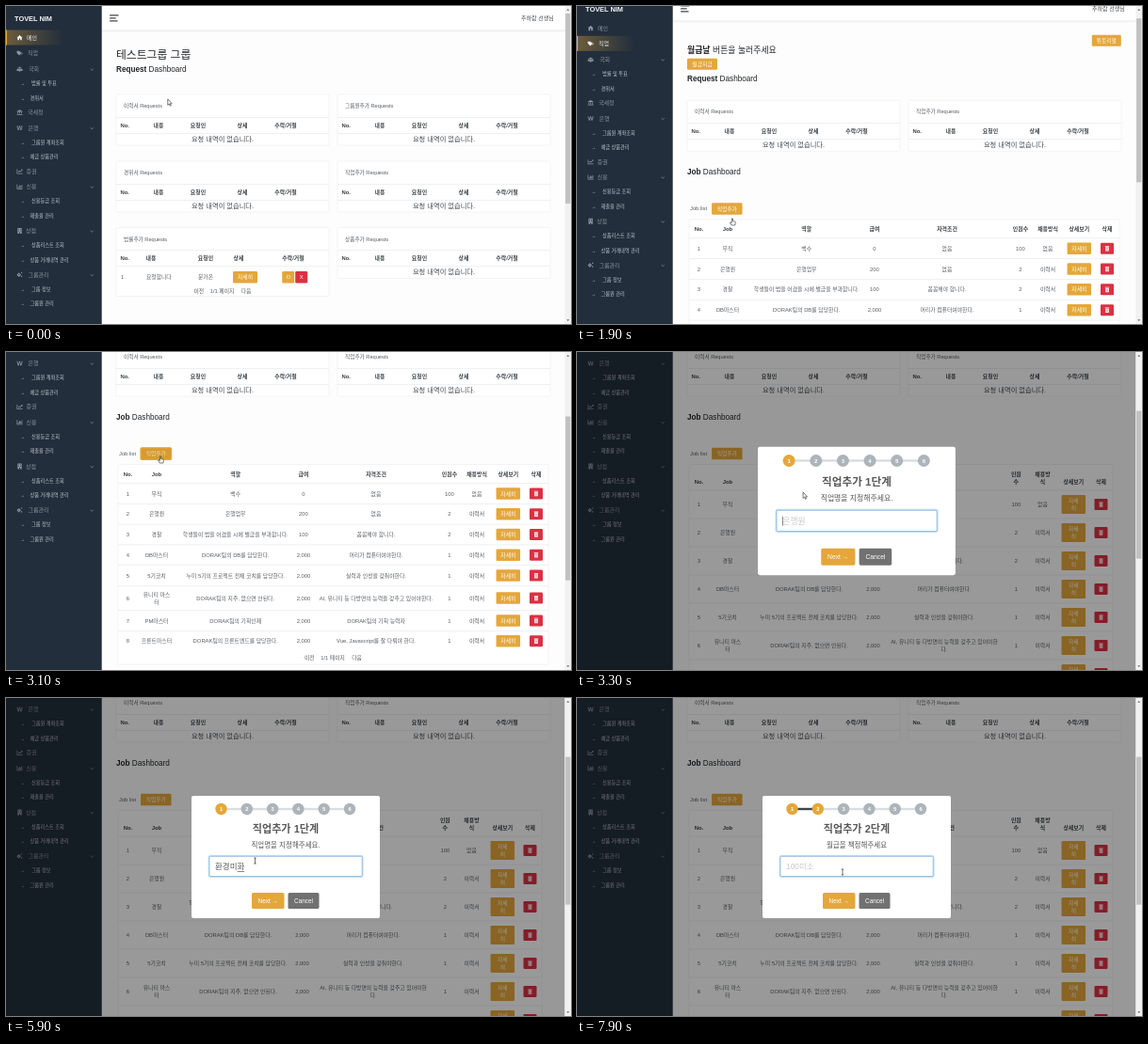
An HTML page for the animation above (8000 ms loop, 600 by 338 pixels).

```html
<!DOCTYPE html>
<html lang="ko">
<head>
<meta charset="utf-8">
<title>Job Dashboard</title>
<style>
html, body { margin: 0; width: 100%; height: 100%; overflow: hidden; background: #fff; }
svg { display: block; width: 600px; height: 338px; }
text { font-family: "Liberation Sans", "Noto Sans CJK KR", "Noto Sans CJK JP", sans-serif; white-space: pre; }
</style>
</head>
<body>
<svg id="stage" viewBox="0 0 600 338" xmlns="http://www.w3.org/2000/svg"></svg>
<script>
const LOOP = 8000;
const GOLD = '#e4a73a', RED = '#dc3043', INK = '#212529', GRAY = '#565c63';

// Drawing helpers; text is placed by the middle of its line.
const text = (x, y, s, size, { fill = GRAY, at = 'start', bold = false } = {}) =>
  `<text x="${x}" y="${(y + size * 0.37).toFixed(2)}" font-size="${size}" fill="${fill}" text-anchor="${at}" font-weight="${bold ? 700 : 400}">${s}</text>`;
const mid = (x, y, s, size, o = {}) => text(x, y, s, size, { at: 'middle', ...o });
const rect = (x, y, w, h, fill, r = 0, extra = '') =>
  `<rect x="${x}" y="${y}" width="${w}" height="${h}" rx="${r}" fill="${fill}" ${extra}/>`;
const path = (d, extra) => `<path d="${d}" ${extra}/>`;
const rule = (x, y, w) => rect(x, y, w, 0.6, '#e3e6e9');
const group = (id, body, extra = '') => `<g id="${id}" ${extra}>${body}</g>`;
const lines = (x, y, s, size, o) => {
  const parts = s.split('|');
  return parts.map((p, i) => mid(x, y + (i - (parts.length - 1) / 2) * 8, p, size, o)).join('');
};
const button = (cx, cy, w, h, s, fill = GOLD) =>
  rect(cx - w / 2, cy - h / 2, w, h, fill, 1.2) + lines(cx, cy, s, 5.8, { fill: '#fff' });
const panel = (x, y, w, h) =>
  rect(x, y, w, h, '#fff', 1.2, 'stroke="#000" stroke-opacity=".045" stroke-width="1"');

// Sidebar
const ICONS = {
  home: 'M0 3.2L3 .4L6 3.2H5.2V5.8H3.6V4H2.4V5.8H.8V3.2Z',
  tags: 'M0 .8H2.6L5 3.2L2.6 5.6L0 3ZM3.4 .8L6.4 3.2L4 5.6L5.6 3.2Z',
  users: 'M1 1.4H2.2V2.6H1ZM3.8 1.4H5V2.6H3.8ZM2.3 .8H3.7V2.6H2.3ZM0 3H1.8V5H0ZM2 3H4V5.6H2ZM4.2 3H6V5H4.2Z',
  bank: 'M0 2L3 .2L6 2V2.5H0ZM.8 2.8H1.6V4.6H.8ZM2.6 2.8H3.4V4.6H2.6ZM4.4 2.8H5.2V4.6H4.4ZM0 4.9H6V5.7H0Z',
  won: 'M0 .8H.9L1.7 4L2.6 .8H3.4L4.3 4L5.1 .8H6L4.8 5.4H3.9L3 2.4L2.1 5.4H1.2ZM0 2.4H6V3H0Z',
  line: 'M0 .6H.7V5H6V5.7H0ZM1.2 3.6L2.6 2L3.6 3L5 1.4L4.4 .9H6V2.5L5.5 2L3.6 4L2.6 3L1.6 4.2Z',
  bars: 'M0 .6H.7V5H6V5.7H0ZM1.3 3H2.1V4.5H1.3ZM2.6 1.4H3.4V4.5H2.6ZM3.9 2.2H4.7V4.5H3.9ZM5.1 1H5.8V4.5H5.1Z',
  shop: 'M.8 0H5.2V6H3.5V4.6H2.5V6H.8ZM1.7 1V1.8H2.5V1ZM3.5 1V1.8H4.3V1ZM1.7 2.7V3.5H2.5V2.7ZM3.5 2.7V3.5H4.3V2.7Z',
  cogs: 'M1.5 1.2H2.9V2L4.1 2.4V4L2.9 4.4V5.2H1.5V4.4L.3 4V2.4L1.5 2ZM1.7 2.8V3.7H2.7V2.8ZM4.5 .4H5.7V1.6H4.5ZM4.5 4.2H5.7V5.4H4.5Z'
};
const MENU = [
  ['home', 33.5, 22, '메인'], ['tags', 50, 23, '직업'],
  ['users', 67, 24, '국회', '법률 및 투표', '경위서'],
  ['bank', 113, 23, '국세청'],
  ['won', 129.5, 23.5, '은행', '그룹원 계좌조회', '예금 상품관리'],
  ['line', 175.7, 21.5, '증권'],
  ['bars', 192, 21.5, '신용', '신용등급 조회', '재출율 관리'],
  ['shop', 239, 21, '상점', '상품리스트 조회', '상품 거래내역 관리'],
  ['cogs', 285.5, 23.5, '그룹관리', '그룹 정보', '그룹원 관리']
];
const menu = active => {
  let out = text(9, 13, 'TOVEL NIM', 7.4, { fill: '#f4f6f8', bold: true });
  MENU.forEach(([icon, y, x, label, ...subs], i) => {
    const on = i === active, fill = on ? '#f1f3f5' : '#8d959d';
    if (on) out += rect(0, y - 8, 102, 16, 'url(#glow)') + rect(0, y - 8, 1, 16, GOLD);
    out += path(ICONS[icon], `transform="translate(11.5 ${y - 3})" fill="${fill}" fill-rule="evenodd"`);
    out += text(x, y, label, 6, { fill });
    if (subs.length) out += path(`M89.6 ${y - 0.2}l1.6 1.5l1.6 -1.5`, 'fill="none" stroke="#8d959d" stroke-width=".7"');
    subs.forEach((s, k) => {
      const sy = y + 15.5 + k * 15.3;
      out += text(15, sy, '→', 5.2, { fill: '#c3c8ce' }) + text(k ? 25.5 : 27, sy, s, 5.2, { fill: '#c3c8ce' });
    });
  });
  return out;
};

// Page parts
const navbar = rect(102, 0, 492, 25.5, '#fff') + rect(102, 25.5, 492, 3, 'url(#fall)') +
  [[10, 9.6], [13, 6.8], [16, 8.6]].map(([y, w]) => rect(110, y - 0.7, w, 1.3, '#40464c', 0.5)).join('') +
  text(547, 12.5, '추하람 선생님', 6, { fill: '#43494f' });

const heading = (y, bold, plain, size = 8.2) =>
  text(117, y, `<tspan font-weight="700">${bold}</tspan>${plain}`, size, { fill: INK });

const HEADS = ['No.', '내용', '요청인', '상세', '수락/거절'];
const requestCard = (x, y, title, h = 54, cols = [9.2, 45, 87, 134, 180]) =>
  panel(x, y, 226, h) + text(x + 8, y + 12, title + ' Requests', 5.65) + rule(x, y + 24, 226) +
  HEADS.map((s, i) => mid(x + cols[i], y + 32.8, s, 5.9, { fill: '#3a4046', bold: true })).join('') +
  rule(x, y + 41, 226);
const emptyCard = (x, y, title) =>
  requestCard(x, y, title) + mid(x + 113, y + 47.3, '요청 내역이 없습니다.', 7.25, { fill: '#43494f' });
const pager = (x, y) => mid(x - 24.7, y, '이전', 5.8) + mid(x, y, '1/1 페이지', 5.8) + mid(x + 25.5, y, '다음', 5.8);

const mainPage = navbar + text(117, 51.5, '테스트그룹 그룹', 11.8, { fill: INK }) + heading(67, 'Request', ' Dashboard') +
  emptyCard(117, 94, '이력서') + emptyCard(352, 94, '그룹원추가') +
  emptyCard(117, 165, '경위서') + emptyCard(352, 165, '직업추가') +
  requestCard(117, 235.5, '법률추가', 73, [9.2, 37, 95, 130, 188]) + emptyCard(352, 235.5, '상품추가') +
  mid(123.5, 288.3, '1', 5.8) + text(149, 288.3, '요청합니다', 5.8) + mid(212, 288.3, '문가온', 5.8) +
  button(254, 288.3, 26, 12.5, '자세히') + button(299.7, 288.3, 13, 12.5, 'O') + button(313.7, 288.3, 13, 12.5, 'X', RED) +
  pager(229.5, 303);

// Job table: role and requirement are [wide, narrow] when they wrap differently.
const JOBS = [
  ['무직', '백수', '0', '없음', '100', '없음'],
  ['은행원', '은행업무', '200', '없음', '2', '이력서'],
  ['경찰', ['학생들이 법을 어겼을 시에 벌금을 부과합니다.', '학생들이 법을 어겼을 시에 벌금을 부과합니|다.'], '100', '꼼꼼해야 합니다.', '2', '이력서'],
  ['DB마스터', 'DORAK팀의 DB를 담당한다.', '2,000', '머리가 컴퓨터여야한다.', '1', '이력서'],
  ['5기코치', '누미 5기의 프로젝트 전체 코치를 담당한다.', '2,000', '실력과 인성을 갖춰야한다.', '1', '이력서'],
  ['유니티 마스|터', 'DORAK팀의 지주, 없으면 안된다.', '2,000', ['AI, 유니티 등 다방면의 능력을 갖추고 있어야한다.', 'AI, 유니티 등 다방면의 능력을 갖추고 있어야한|다.'], '1', '이력서'],
  ['PM마스터', 'DORAK팀의 기획인재', '2,000', 'DORAK팀의 기획 능력자', '1', '이력서'],
  ['프론트마스터', 'DORAK팀의 프론트엔드를 담당한다.', '2,000', 'Vue, Javascript를 잘 다뤄야 한다.', '1', '이력서']
];
const WIDE = {
  cols: [129.5, 160, 243.7, 316, 393, 471, 500, 533.3, 563], right: 576, headY: 247.3, top: 257,
  heights: [21.8, 21.8, 21.8, 21.8, 21.8, 26, 21.8, 21.8],
  heads: ['No.', 'Job', '역할', '급여', '자격조건', '인원수', '채용방식', '상세보기', '삭제'], view: '자세히', viewH: 12.5
};
const NARROW = {
  ...WIDE, cols: [129.5, 160, 246.5, 314.5, 390, 466.3, 494.5, 527.3, 556.5], right: 569, headY: 255.5, top: 264.5,
  heights: Array(8).fill(30),
  heads: ['No.', 'Job', '역할', '급여', '자격조건', '인원|수', '채용방|식', '상세보기', '삭제'], view: '자세|히', viewH: 20
};
const trash = (x, y) => rect(x - 7, y - 6, 14, 12, RED, 1.2) +
  path(`M${x - 2.2} ${y - 2.6}h4.4v.8h-4.4zM${x - 1.8} ${y - 1.4}h3.6v4.2h-3.6z`, 'fill="#fff"') +
  path(`M${x - 0.6} ${y - 0.8}v3M${x + 0.6} ${y - 0.8}v3`, `stroke="${RED}" stroke-width=".4"`);
const jobTable = (v, narrow) => {
  const w = v.right - 119, total = v.heights.reduce((a, b) => a + b);
  let y = v.top;
  let out = panel(119, 237, w, v.top - 237 + total + 14);
  v.heads.forEach((s, i) => {
    out += lines(v.cols[i], v.headY - (s.includes('|') ? 4 : 0), s, 5.9, { fill: '#3a4046', bold: true });
  });
  JOBS.forEach((job, r) => {
    const cy = y + v.heights[r] / 2;
    out += rule(119, y - 0.3, w);
    [String(r + 1), ...job].forEach((c, i) => {
      out += lines(v.cols[i], cy, Array.isArray(c) ? c[narrow] : c, 5.85);
    });
    out += button(v.cols[7], cy, 25.5, v.viewH, v.view) + trash(v.cols[8], cy);
    y += v.heights[r];
  });
  return out + pager(347, y + 6.5);
};
const jobPage = navbar + button(562.3, 46.8, 31, 12, '튜토리얼') +
  heading(57.3, '월급날', ' 버튼을 눌러주세요', 8.9) + button(133, 71.8, 32, 12, '월급지급') +
  heading(87, 'Request', ' Dashboard') + emptyCard(117, 110.5, '이력서') + emptyCard(352, 110.5, '직업추가') +
  heading(186.5, 'Job', ' Dashboard') + text(120, 225.5, 'Job list', 5.8) + button(159.3, 225.6, 32.5, 12.5, '직업추가') +
  group('addHover', rect(143, 219.3, 32.6, 12.6, '#b87f14', 1.2, 'fill-opacity=".3" stroke="#e4a73a" stroke-width="1.2"')) +
  group('wide', jobTable(WIDE, 0)) + group('narrow', jobTable(NARROW, 1));

// Dialog
const STEP_X = i => 228.5 + i * 27.3;
const steps = active => {
  let out = '';
  for (let i = 0; i < 5; i++) out += rect(STEP_X(i), 116.8, 27.3, 2.4, i < active ? '#3c4650' : '#d9dee2');
  for (let i = 0; i < 6; i++)
    out += `<circle cx="${STEP_X(i)}" cy="118" r="6.2" fill="${i <= active ? GOLD : '#adb4ba'}"/>` +
      mid(STEP_X(i), 118, i + 1, 5.8, { fill: '#fff', bold: true });
  return out;
};
const question = (n, prompt, hint) => steps(n) +
  mid(297, 138.7, `직업추가 ${n + 1}단계`, 11.1, { fill: '#595959', bold: true }) +
  mid(297, 156, prompt, 7.5, { fill: '#545454' }) +
  group('hint' + n, text(222, 179.3, hint, 8.4, { fill: '#c8c8c8' }));
const dialog = rect(197, 104, 200, 130, '#fff', 2) +
  rect(215.6, 167.9, 163, 22, '#fff', 1.6, 'stroke="#c4dcf0" stroke-width="2"') +
  rect(216, 168.3, 162.2, 21.2, '#fff', 1.3, 'stroke="#87b9de" stroke-width=".8"') +
  group('ask0', question(0, '직업명을 지정해주세요.', '은행원')) +
  group('ask1', question(1, '월급을 책정해주세요', '100미소')) +
  '<text id="typed" x="222" y="182.4" font-size="8.5" fill="#545454"></text>' +
  rect(222, 184, 7.4, 0.7, '#545454', 0, 'id="compose"') + rect(221.6, 174.5, 0.6, 9.5, '#333', 0, 'id="caret"') +
  rect(261, 207, 34.5, 17, GOLD, 1.6) + rect(261, 207, 34.5, 17, '#9a6a10', 1.6, 'id="nextHover" fill-opacity=".25"') +
  mid(278.2, 215.5, 'Next →', 6.4, { fill: '#fff' }) +
  rect(299.5, 207, 33, 17, '#717171', 1.6) + mid(316, 215.5, 'Cancel', 6.4, { fill: '#fff' });

const outline = 'stroke="#222" stroke-width=".6" stroke-linejoin="round"';
const cursors = group('arrow', path('M0 0V6.4L1.5 5.1L2.5 7.3L3.5 6.8L2.5 4.8H4.4Z', 'fill="#fff" ' + outline)) +
  group('hand', path('M-.6 0Q0 -.7 .6 0V2.6L3 3.2Q3.6 3.5 3.4 4.4L2.8 7H-.8L-2.4 4.4Q-2.4 3.5 -1.4 4L-.6 4.6Z', 'fill="#fff" ' + outline)) +
  group('beam', path('M-1.2 -3H1.2M0 -3V3M-1.2 3H1.2', 'stroke="#333" stroke-width=".7" fill="none"'));

document.getElementById('stage').innerHTML = `<defs>
  <linearGradient id="glow"><stop stop-color="${GOLD}" stop-opacity=".38"/><stop offset=".6" stop-color="${GOLD}" stop-opacity="0"/></linearGradient>
  <linearGradient id="fall" x2="0" y2="1"><stop stop-opacity=".07"/><stop offset="1" stop-opacity="0"/></linearGradient></defs>` +
  rect(0, 0, 600, 338, '#fdfdfd') + rect(0, 0, 101.7, 338, '#222e3c') +
  group('page', group('main', menu(0) + mainPage) + group('job', menu(1) + jobPage)) +
  rect(0, 0, 593.5, 338, '#000', 0, 'id="shade"') + group('dialog', dialog) +
  rect(593.5, 0, 6.5, 338, '#f1f1f1') + rect(594.1, 8, 5.2, 200, '#c1c1c1', 0, 'id="thumb"') +
  path('M595.3 4.8L596.8 3L598.3 4.8ZM595.3 333.2L596.8 335L598.3 333.2Z', 'fill="#666"') +
  group('cursor', cursors);

// Timeline
const OPEN = 3165, SWITCH = 600, NEXT = 7400;
const SCROLL = [[1800, 0], [1900, 10], [2000, 27], [2200, 68], [2400, 100], [2600, 114], [2700, 117.5]];
const POP = [[0, 0.7], [135, 1.05], [240, 0.95], [300, 1]];
const CURSOR_X = [[0, 172], [100, 150], [400, 30], [900, 30], [1000, 44], [1600, 162], [1800, 165], [3100, 164], [3170, 166], [3300, 240], [3600, 262], [3800, 264.5], [6650, 264.5], [7000, 278], [7500, 278], [7800, 282]];
const CURSOR_Y = [[0, 99], [100, 93], [400, 50], [900, 52], [1000, 70], [1600, 222], [1800, 226], [2500, 226], [3000, 111], [3170, 111], [3300, 149], [3600, 172], [3800, 173], [6650, 173], [7000, 218], [7500, 218], [7800, 185]];
const POINTER = [[0, 'arrow'], [350, 'hand'], [1000, 'arrow'], [1600, 'hand'], [3200, 'arrow'], [3500, 'beam'], [6900, 'hand'], [7600, 'beam']];
const TYPED = [[0, ''], [4600, 'ㅎ'], [4700, '호'], [4800, '화'], [4900, '환'], [5000, '환ㄱ'], [5100, '환겨'], [5200, '환경'], [5300, '환경ㅁ'], [5600, '환경미'], [5700, '환경미ㅎ'], [5800, '환경미호'], [5900, '환경미화'], [6000, '환경미화워'], [6200, '환경미화원'], [NEXT, '']];

const tween = (keys, t) => {
  const i = keys.findIndex(k => k[0] > t);
  if (i === 0) return keys[0][1];
  if (i < 0) return keys[keys.length - 1][1];
  const [t0, a] = keys[i - 1], [t1, b] = keys[i];
  return a + (b - a) * (t - t0) / (t1 - t0);
};
const held = (keys, t) => keys.filter(k => k[0] <= t).pop()[1];
const el = id => document.getElementById(id);
const show = (id, on) => { el(id).style.display = on ? '' : 'none'; };

function draw(t) {
  const onMain = t < SWITCH, open = t >= OPEN, second = t >= NEXT;
  const scroll = tween(SCROLL, t), word = held(TYPED, t), pointer = held(POINTER, t);

  show('main', onMain);
  show('job', !onMain);
  show('wide', t >= 800 && !open);
  show('narrow', open);
  show('addHover', t >= 2950 && !open);
  el('page').setAttribute('transform', `translate(0 ${-scroll})`);

  const height = onMain ? 539 : open ? 693 : 625, ratio = 322 / height;
  el('thumb').setAttribute('y', 8 + scroll * ratio);
  el('thumb').setAttribute('height', 338 * ratio);

  el('shade').setAttribute('opacity', 0.4 * Math.min(1, Math.max(0, (t - OPEN) / 100)));
  show('dialog', open);
  const age = t - (second ? NEXT : OPEN), k = tween(POP, age);
  el('dialog').setAttribute('transform', `translate(297 169) scale(${k}) translate(-297 -169)`);
  el('dialog').setAttribute('opacity', Math.min(1, 0.3 + age / 120));
  show('ask0', !second);
  show('ask1', second);
  show('hint0', !word);
  el('typed').textContent = word;
  show('compose', word);
  el('compose').setAttribute('x', 222.2 + (word.length - 1) * 7.82);
  show('caret', !word && !second && Math.floor((t - 3200) / 500) % 2 === 0);
  show('nextHover', t >= 7000 && t < 7600);

  ['arrow', 'hand', 'beam'].forEach(id => show(id, id === pointer));
  el('cursor').setAttribute('transform', `translate(${tween(CURSOR_X, t)} ${tween(CURSOR_Y, t)})`);
}

const start = performance.now();
function frame() {
  draw((performance.now() - start) % LOOP);
  requestAnimationFrame(frame);
}
frame();
</script>
</body>
</html>
```
